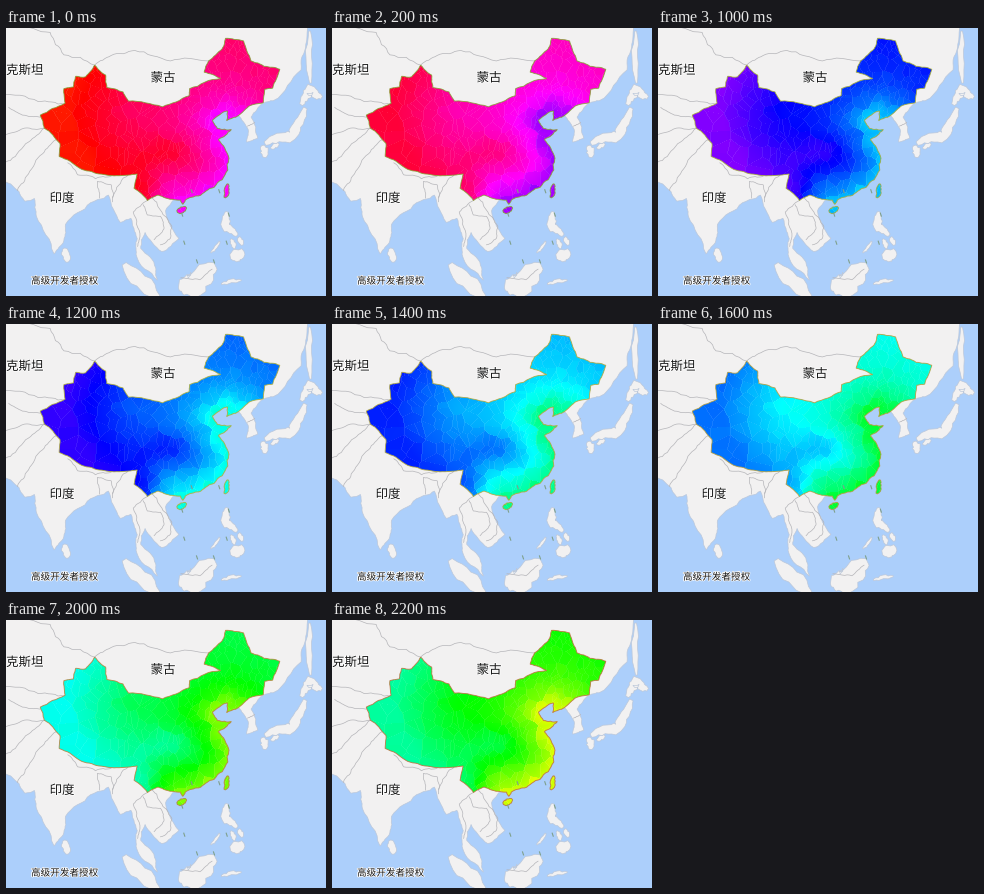
Write a matplotlib script that moves like this. It is 320x268 px and loops after 2.4 s.

```python
import colorsys
import numpy as np
import matplotlib.pyplot as plt
import matplotlib.patheffects as pe
from matplotlib.animation import FuncAnimation
from matplotlib.colors import hsv_to_rgb
from matplotlib.patches import PathPatch
from matplotlib.path import Path

W, H, DPI = 320, 268, 100
STEPS, STEP_MS = 12, 200
SEA, LAND, SHORE, BORDER = "#accffb", "#f2f1f1", "#bcc8da", "#b4b4b8"
rng = np.random.default_rng(7)

# Key points as longitude, latitude; rough() adds the small bends.
SOUTH_COAST = [
    (60, 25.3), (66.5, 25.2), (70, 21.2), (72.5, 21.8), (73, 17.5), (77.5, 8.1),
    (80, 11.5), (80.4, 15.5), (86.8, 20.8), (91.3, 22.6), (94.3, 16), (97, 17),
    (98.6, 12), (98.3, 8), (103.7, 1.4), (103.3, 4.5), (99.5, 9.5),
    (100.6, 13.5), (104.8, 8.7), (109.2, 12), (105.8, 18.8), (108, 21.5)]
CHINA_COAST = [
    (108, 21.5), (109.6, 21.4), (110.2, 20.4), (110.8, 21.4), (114.2, 22.4),
    (118.1, 24.4), (121.6, 28.4), (121.9, 31), (119.2, 35), (122.5, 37.1),
    (119, 37.3), (117.7, 39), (121.5, 40.8), (121.3, 38.9), (124.3, 39.9)]
EAST_COAST = [
    (124.3, 39.9), (126.6, 37.4), (126.4, 34.5), (129.2, 35.3), (127.5, 39.6),
    (130.6, 42.3), (133.2, 42.8), (140.2, 48.3), (141.4, 52.5), (143, 57)]
CHINA_NORTH = [
    (124.3, 39.9), (126.9, 41.7), (130.6, 42.4), (131, 44.9), (133, 45.1),
    (134.8, 48.4), (130.8, 48.9), (127.5, 49.8), (125.6, 53), (121, 53.4),
    (120.2, 51.8), (116.7, 49.8), (115.6, 47.9), (119.8, 46.8), (111.9, 45),
    (111.8, 43.7), (105, 41.6), (96.4, 42.7), (95, 44.4), (90.9, 45.2),
    (90.6, 47.4), (87.8, 49.1)]
CHINA_WEST = [
    (87.8, 49.1), (85.5, 47.1), (83, 47.2), (82.4, 45.3), (80, 45),
    (80.3, 42.3), (74, 40), (75, 37.4), (79, 34.2), (78.8, 31.4), (84, 28.8),
    (88.9, 27.5), (94, 27.1), (98.6, 27.5), (97.8, 24.2), (101.2, 21.3),
    (103.9, 22.6), (108, 21.5)]
TAIWAN = [(121.6, 25.2), (120.8, 22)], 5
HAINAN = [(108.7, 18.7), (111, 19.7)], 6

# Island spine and width in pixels.
ISLANDS = [
    ([(130.5, 33.8), (131, 31.2)], 8), ([(132.5, 33.2), (134.6, 34)], 5),
    ([(131, 34.2), (138, 35.8), (141.3, 41.4)], 11),
    ([(140.2, 42), (142.3, 45), (145.4, 43.3)], 10),
    ([(142.4, 54.5), (142.6, 46)], 6), ([(80, 9.5), (80.8, 6)], 8),
    ([(121.4, 18.6), (121, 15), (124, 12.8)], 9),
    ([(122.3, 11.8), (123.2, 9.4)], 5), ([(124.6, 12.4), (125.2, 10.3)], 5),
    ([(119.5, 11.3), (117.3, 8.4)], 3), ([(122.2, 7.4), (125.8, 7.6)], 13),
    ([(109.2, 0.5), (113, 0), (118.5, 5)], 25),
    ([(95.3, 5.6), (104, -3)], 16), ([(120, 0.4), (125, 1.4)], 4)]

BORDERS = [
    [(87.8, 49.1), (92, 50.7), (98, 51.5), (107, 49.8), (116.7, 49.8)],
    [(87.8, 49.1), (80, 50.8), (76.5, 54.3), (68, 55)],
    [(80.2, 42.1), (73.5, 42.6), (64, 43.6)],
    [(74, 39.6), (69.5, 40), (66, 41.5)],
    [(75, 37.4), (70, 37.4), (64, 36)],
    [(75, 37.4), (71, 34.5), (66.4, 30.5), (62, 29.4)],
    [(68.2, 23.7), (71, 27.5), (74.6, 32), (78, 35)],
    [(81, 30), (83.5, 27.3), (88, 26.4), (92, 27)],
    [(89, 21.9), (88.5, 25.8), (92, 25), (92.3, 21)],
    [(92.4, 22), (95, 26.5), (97.3, 28.2)],
    [(101.2, 21.3), (97.6, 18.5), (99.3, 12.5), (98.7, 10)],
    [(100.1, 20.3), (101.2, 17.8), (104.5, 17.5), (105.4, 14.4), (102.9, 11.7)],
    [(102, 22.4), (104.5, 19), (107.4, 15), (107, 12), (104.5, 10.4)],
    [(109.7, 2), (114.5, 1.5), (117.6, 4.2)],
    [(126.6, 37.8), (128.4, 38.5)]]


def project(points):
    lon, lat = np.array(points, float).T
    merc = np.degrees(np.log(np.tan(np.radians(45 + lat / 2))))
    return np.column_stack([32.3 + (lon - 73.5) * 3.94, 9.7 + (63.56 - merc) * 3.9])


def rough(points, amount=0.1, levels=3):
    """Project a line and add small bends between its points."""
    xy = project(points)
    for _ in range(levels):
        a, b = xy[:-1], xy[1:]
        normal = (b - a)[:, ::-1] * (-1, 1)
        mid = (a + b) / 2 + normal * rng.uniform(-amount, amount, (len(a), 1))
        out = np.empty((len(xy) + len(mid), 2))
        out[::2], out[1::2] = xy, mid
        xy = out
    return xy


def island(spine, width):
    """Widen a spine into a ragged lens."""
    xy = rough(spine)
    tangent = np.gradient(xy, axis=0)
    normal = tangent[:, ::-1] * (-1, 1) / np.hypot(*tangent.T)[:, None]
    half = width / 2 * np.sin(np.linspace(0.15, np.pi - 0.15, len(xy))) ** 0.6
    left, right = (xy + s * normal * (half * rng.uniform(0.75, 1.15, len(xy)))[:, None]
                   for s in (1, -1))
    return np.vstack([left, right[::-1], left[:1]])


def add_land(xy):
    ax.add_patch(PathPatch(Path(xy), fc=LAND, ec=SHORE, lw=0.5))


def base_hue(x, y, shore):
    """Starting hue: quick rise inland, more in the far west and the middle."""
    d = np.min([np.hypot(x - px, y - py) for px, py in shore], axis=0)
    west = np.clip(np.hypot(x - 135, y - 85) / 70, 0, 1) ** 1.2
    west /= 1 + np.exp((x - 148) / 8)
    middle = np.exp(-((x - 166) / 27) ** 2 - ((y - 125) / 16) ** 2)
    return 296 + 40 * (1 - np.exp(-d / 22)) + 29 * west + 15 * middle


def districts(shore, n=520):
    """Starting hue per pixel, nearly flat in each district, and the seams."""
    sx = 28 + 250 * rng.beta(2.1, 1.5, n)
    sy = rng.uniform(5, 190, n)
    hues = base_hue(sx, sy, shore) + rng.uniform(-2.5, 2.5, n)
    gx, gy = np.meshgrid(np.arange(W) + 0.5, np.arange(H) + 0.5)
    cell = np.array([((x[:, None] - sx) ** 2 + (y[:, None] - sy) ** 2).argmin(1)
                     for x, y in zip(gx, gy)])
    seam = np.zeros((H, W))
    seam[:, 1:] = cell[:, 1:] != cell[:, :-1]
    return 0.6 * hues[cell] + 0.4 * base_hue(gx, gy, shore), seam


fig = plt.figure(figsize=(W / DPI, H / DPI), dpi=DPI, facecolor=SEA)
ax = fig.add_axes([0, 0, 1, 1])
ax.set(xlim=(0, W), ylim=(H, 0))
ax.axis("off")

coast = rough(CHINA_COAST)
add_land(np.vstack([rough(SOUTH_COAST), coast, rough(EAST_COAST),
                    [(-30, -30), (-30, 157)]]))
for spine, width in ISLANDS:
    add_land(island(spine, width))
for line in BORDERS:
    ax.plot(*rough(line).T, color=BORDER, lw=0.5)

taiwan, hainan = island(*TAIWAN), island(*HAINAN)
mainland = np.vstack([coast, rough(CHINA_NORTH, 0.06), rough(CHINA_WEST, 0.06)])
china = Path.make_compound_path(Path(mainland), Path(taiwan), Path(hainan))
start_hue, seams = districts(np.vstack([coast[::2], taiwan[::4], hainan[::4]]))
speed = 19.1 + 1.8 * (360 - start_hue) / 62
picture = ax.imshow(np.zeros((H, W, 3)), extent=(0, W, H, 0), aspect="auto",
                    interpolation="nearest", zorder=3)
picture.set_clip_path(china, ax.transData)
outline = PathPatch(china, fc="none", lw=0.65, alpha=0.85, zorder=4)
ax.add_patch(outline)

# Dashed sea line on a half ellipse.
for a in np.radians(np.linspace(-55, 235, 8)):
    x, y = 199 + 24 * np.cos(a), 196 + 40 * np.sin(a)
    ax.plot([x, x + 1], [y - 1.5, y + 1.5], color="#7fa08c", lw=0.8, zorder=4)


def label(x, y, text, px, ha="center"):
    ax.text(x, y, text, fontsize=px * 72 / DPI, family="Noto Sans CJK JP",
            color="#151515", ha=ha, va="center_baseline", zorder=6,
            path_effects=[pe.withStroke(linewidth=1.1, foreground="white")])


label(0, 41, "克斯坦", 12.5, "left")
label(157, 48.5, "蒙古", 12.5)
label(56, 169, "印度", 12.5)
label(25, 252, "高级开发者授权", 9.6, "left")


def draw(i):
    hue = (start_hue - speed * i) % 360 / 360
    rgb = hsv_to_rgb(np.dstack([hue, np.ones_like(hue), np.ones_like(hue)]))
    picture.set_data(rgb + (1 - rgb) * 0.09 * seams[..., None])
    t = i / (STEPS - 1)
    outline.set_edgecolor(colorsys.hsv_to_rgb((75 - 52 * t * t) / 360, 0.7, 0.62 + 0.13 * t))
    return picture, outline


anim = FuncAnimation(fig, draw, frames=STEPS, interval=STEP_MS,
                     repeat=True, repeat_delay=0, blit=False)
plt.show()
```
